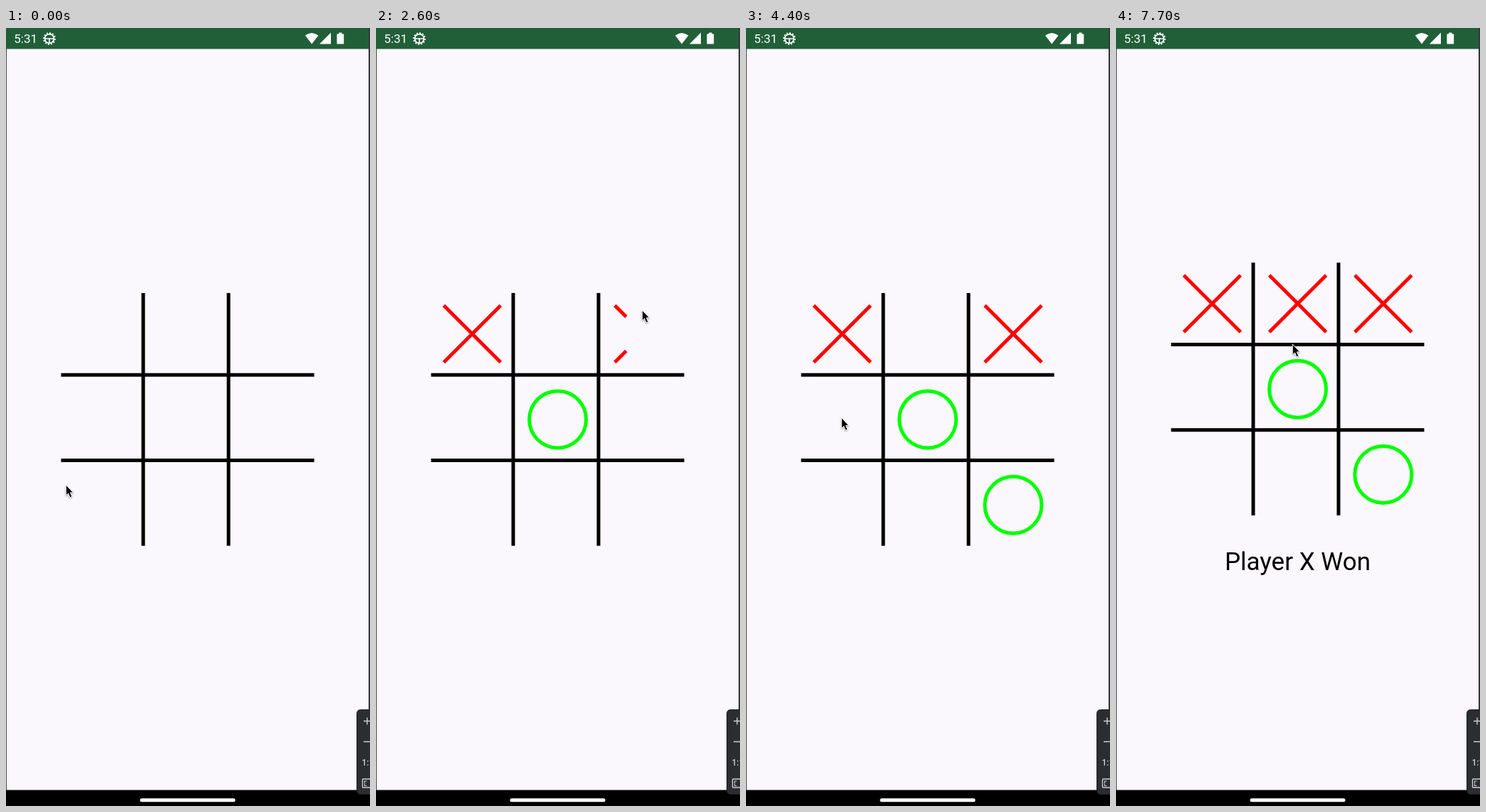
An HTML page for the animation above (8000 ms loop, 512 by 1095 pixels).

```html
<!DOCTYPE html>
<html lang="en">
<head>
<meta charset="utf-8">
<title>Tic-tac-toe</title>
<style>
  html, body { margin: 0; width: 100%; height: 100%; overflow: hidden; background: #faf8fc; }
  svg { display: block; }
  text { font-family: Roboto, sans-serif; }
  .line { fill: none; stroke-width: 5; }
</style>
</head>
<body>
<svg width="512" height="1095" viewBox="0 0 512 1095">
  <rect width="512" height="1095" fill="#faf8fc"/>

  <!-- status bar -->
  <rect width="512" height="29.5" fill="#215f39"/>
  <text x="11.3" y="21.3" font-size="17" fill="#fff">5:31</text>
  <g fill="none" stroke="#fff">
    <circle cx="61" cy="15" r="6.4" stroke-width="1.7"/>
    <circle cx="61" cy="15" r="8" stroke-width="1.8" pathLength="24" stroke-dasharray="1"/>
    <path d="M55 15h12M61 15v6" stroke-width="1.7"/>
  </g>
  <g fill="#fff">
    <path d="M420.8 10.6Q430 3.4 439.4 10.6L430.1 22.6z"/>
    <path d="M441 22.5H457V6.5z"/>
    <path d="M468.2 8.2V6.6h4.2v1.6h1.6q1.2 0 1.2 1.2v12q0 1.2-1.2 1.2h-7.4q-1.2 0-1.2-1.2v-12q0-1.2 1.2-1.2z"/>
  </g>

  <!-- device frame -->
  <path d="M.5 29V1095" stroke="#45464a"/>
  <path d="M511 0V1095" stroke="#35363b" stroke-width="2"/>
  <rect y="1072.5" width="512" height="22.5"/>
  <rect x="188.5" y="1084.3" width="134" height="5" rx="2.5" fill="#fff"/>

  <!-- zoom panel -->
  <rect x="493.5" y="959.5" width="40" height="119" rx="5" fill="#2b2d30" stroke="#1e1f22"/>
  <g fill="none" stroke="#ced0d6" stroke-width="1.4">
    <path d="M503 975.5h10M508 970.5v10M503 1004.5h10"/>
    <rect x="501.5" y="1057" width="14" height="12" rx="1"/>
    <path d="M504.5 1063v-3h3M504.5 1063.5v3h3" stroke-width="1.1"/>
  </g>
  <text x="500.5" y="1037.5" font-size="12" font-weight="500" fill="#ced0d6">1:1</text>

  <g id="board">
    <path class="line" stroke="#000" d="M193 373V728.7M313 373V728.7M77.5 488.2H433.5M77.5 608.5H433.5"/>
  </g>
  <text id="result" x="255.5" y="763" font-size="35" text-anchor="middle">Player X Won</text>
  <path id="cursor" d="M.3 0V15L3.6 11.9 6 17.8 8.8 16.6 6.4 10.9H10.6z" stroke="#fff"
        style="filter:drop-shadow(0 1px 1px #0006)"/>
</svg>
<script>
const LOOP = 8000, STEP = 100, DRAW = 500, WIN = 5700;
const $ = id => document.getElementById(id);

// mark, column, row, start time
const moves = [
  ['X', 0, 0, 800], ['O', 1, 1, 1700], ['X', 2, 0, 2500],
  ['O', 2, 2, 3400], ['X', 1, 0, 5800]
];

// time, x, y of the pointer tip
const track = [
  [0, 84, 643], [400, 162, 415], [1000, 162, 415], [1400, 241, 533],
  [1800, 241, 533], [2200, 374, 397], [2700, 374, 397], [3200, 370, 685],
  [3500, 370, 685], [3700, 313, 599], [4100, 140, 560], [4400, 134, 548.5],
  [4600, 134, 548.5], [5100, 248, 445], [LOOP, 248, 445]
];

function stroke(d, color) {
  const p = document.createElementNS('http://www.w3.org/2000/svg', 'path');
  const attrs = { class: 'line', d, stroke: color, pathLength: 1 };
  for (const k in attrs) p.setAttribute(k, attrs[k]);
  return $('board').appendChild(p);
}

const marks = moves.map(([mark, col, row, start]) => {
  const x = 135.3 + col * 120.3, y = 430.6 + row * 120.3, r = 40;
  const strokes = mark === 'X'
    ? [1, -1].map(s => stroke(`M${x - r} ${y - s * r}l${2 * r} ${2 * s * r}`, '#f00'))
    : [stroke(`M${x + r} ${y}a${r} ${r} 0 0 1 ${-2 * r} 0a${r} ${r} 0 0 1 ${2 * r} 0`, '#0f0')];
  return { start, strokes };
});

function pointer(t) {
  const i = track.findIndex(k => k[0] > t);
  const [t0, x0, y0] = track[i - 1], [t1, x1, y1] = track[i];
  const p = (t - t0) / (t1 - t0);
  return [x0 + (x1 - x0) * p, y0 + (y1 - y0) * p];
}

function render(now) {
  const t = Math.floor(now % LOOP / STEP) * STEP;
  for (const { start, strokes } of marks) {
    const p = Math.min(1, Math.max(0, (t - start) / DRAW));
    for (const s of strokes) {
      s.style.display = p ? '' : 'none';
      s.setAttribute('stroke-dasharray', p < 1 ? `${p} 2` : 'none');
    }
  }
  const won = t >= WIN;
  $('board').setAttribute('transform', `translate(0 ${won ? -42.7 : 0})`);
  $('result').style.display = won ? '' : 'none';
  $('cursor').setAttribute('transform', `translate(${pointer(t)})`);
}

const begin = performance.now();
function frame() {
  render(performance.now() - begin);
  requestAnimationFrame(frame);
}
frame();
</script>
</body>
</html>
```
